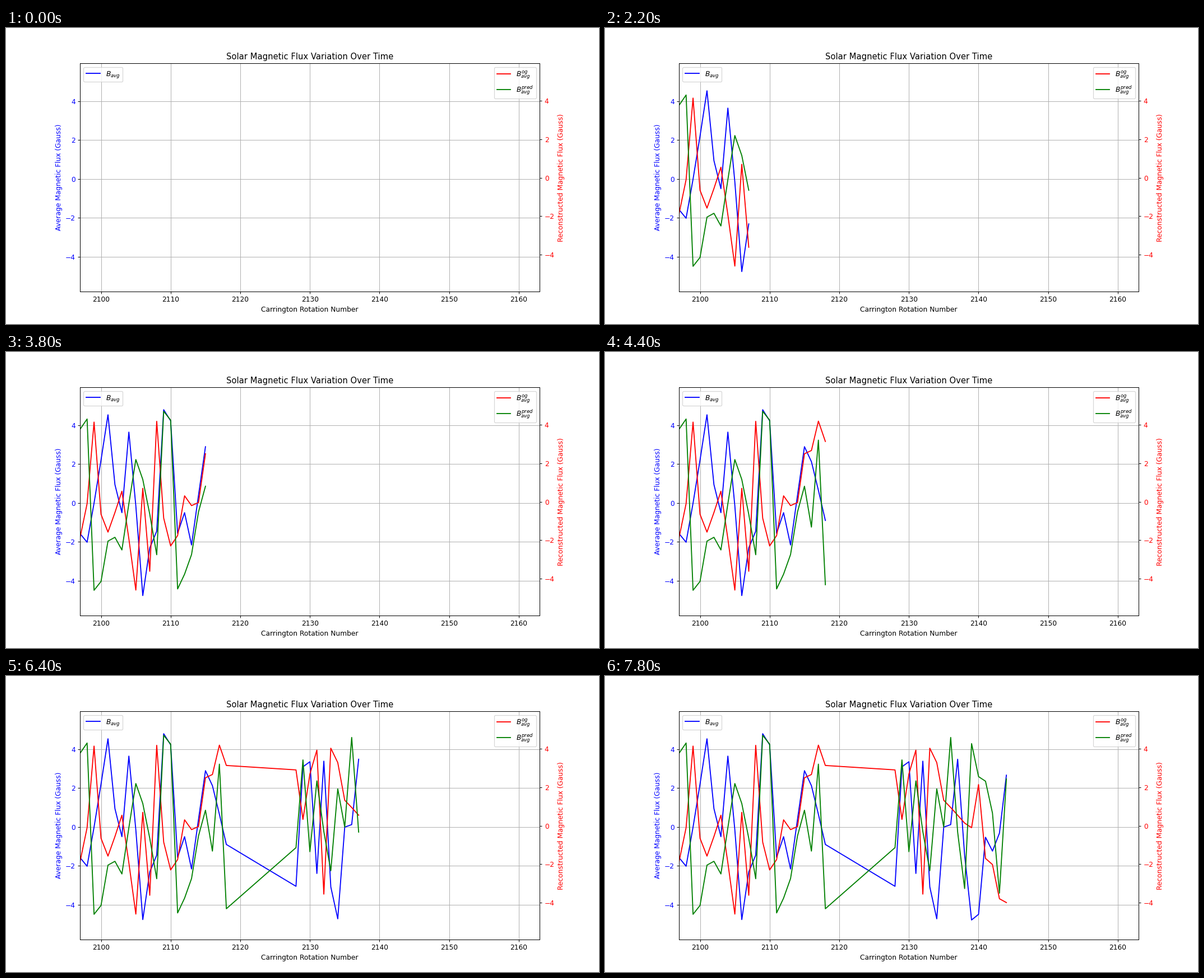
A matplotlib script for the animation above (8000 ms loop, 1058x529 px).

```python
import numpy as np
import matplotlib.pyplot as plt
from matplotlib.animation import FuncAnimation

plt.rcParams["font.family"] = "DejaVu Sans"

# Rotations 2119 to 2127 have no data
rotations = np.r_[2097:2119, 2128:2145]

b_avg = [
    -1.58, -2.02, -0.01, 2.20, 4.53, 0.94, -0.50, 3.64, -0.15, -4.76,
    -2.31, -1.45, 4.79, 4.22, -1.56, -0.50, -2.16, 0.39, 2.89, 2.12,
    0.65, -0.90, -3.05, 3.09, 3.35, -2.39, 3.38, -3.08, -4.72, -0.01,
    0.12, 3.48, -1.45, -4.78, -4.49, -0.53, -1.24, -0.32, 2.66,
]
b_og = [
    -1.85, -0.10, 4.15, -0.65, -1.58, -0.56, 0.55, -1.93, -4.60, 0.70,
    -3.62, 4.19, -0.85, -2.30, -1.76, 0.31, -0.20, -0.04, 2.50, 2.67,
    4.20, 3.14, 2.91, 0.33, 2.70, 3.94, -3.56, 4.04, 3.29, 1.33,
    0.95, 0.55, 0.14, -0.10, 2.15, -1.70, -2.02, -3.80, -4.00,
]
b_pred = [
    3.78, 4.31, -4.61, -4.15, -2.05, -1.85, -2.51, -0.10, 2.20, 1.16,
    -0.65, -2.76, 4.71, 4.25, -4.54, -3.77, -2.75, -0.53, 0.81, -1.32,
    3.21, -4.32, -1.14, 3.43, -1.35, 2.34, -0.30, -2.34, 1.92, -0.07,
    4.60, -0.33, -3.27, 4.28, 2.56, 2.32, 0.66, -3.51, 2.44,
]

# 12 x 6 inches at this dpi gives 1058 x 529 pixels
fig, ax = plt.subplots(figsize=(12, 6), dpi=88.16667)
twin = ax.twinx()


def style_y(axis, label, color, limits):
    axis.set_ylabel(label, color=color)
    axis.tick_params(axis="y", labelcolor=color)
    axis.set_ylim(*limits)
    axis.set_yticks(range(-4, 5, 2))


ax.set_title("Solar Magnetic Flux Variation Over Time")
ax.set_xlabel("Carrington Rotation Number")
ax.set_xlim(2097, 2163)
ax.set_xticks(range(2100, 2161, 10))
ax.grid(True)
style_y(ax, "Average Magnetic Flux (Gauss)", "blue", (-5.78, 5.93))
style_y(twin, "Reconstructed Magnetic Flux (Gauss)", "red", (-5.92, 5.95))

series = [
    (ax.plot([], [], color="blue", label=r"$B_{avg}$")[0], b_avg),
    (twin.plot([], [], color="red", label=r"$B_{avg}^{og}$")[0], b_og),
    (twin.plot([], [], color="green", label=r"$B_{avg}^{pred}$")[0], b_pred),
]
ax.legend(loc="upper left")
twin.legend(loc="upper right")


def update(count):
    """Show the first `count` points of every series."""
    for line, values in series:
        line.set_data(rotations[:count], values[:count])
    return [line for line, _ in series]


anim = FuncAnimation(fig, update, frames=len(rotations) + 1, interval=200,
                     repeat=True)
plt.show()
```
